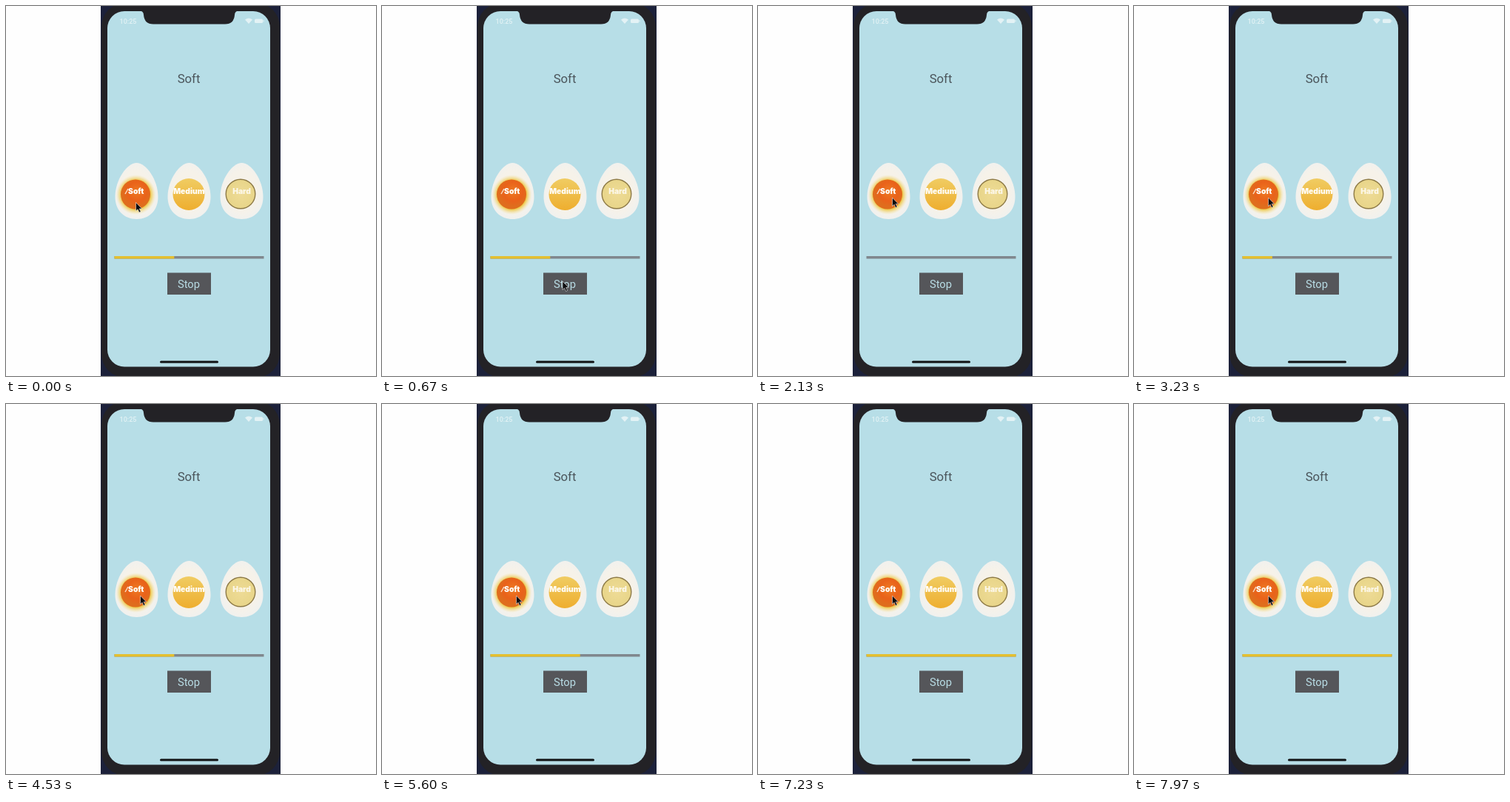
An HTML page that plays this animation: 500x500 px, repeating every 8000 ms.

```html
<!DOCTYPE html>
<html lang="en">
<head>
<meta charset="utf-8">
<title>Egg timer</title>
<style>
  html, body { margin: 0; width: 100%; height: 100%; overflow: hidden; background: #fefefe; }
  svg { display: block; width: 100%; height: 100%; }
  text { text-anchor: middle; font-family: Roboto, sans-serif; }
  .label { font: 900 10.3px Inter, sans-serif; fill: #fffdf8; }
</style>
</head>
<body>
<svg viewBox="0 0 500 500">
  <defs>
    <radialGradient id="white">
      <stop offset=".7" stop-color="#f6f2e9"/>
      <stop offset="1" stop-color="#f1f1ee"/>
    </radialGradient>
    <radialGradient id="halo">
      <stop offset=".72" stop-color="#ecc43f"/>
      <stop offset="1" stop-color="#f3e2a0" stop-opacity="0"/>
    </radialGradient>
    <radialGradient id="soft" cx=".55" cy=".4">
      <stop offset="0" stop-color="#ee7a22"/>
      <stop offset=".65" stop-color="#e9621a"/>
      <stop offset="1" stop-color="#df6d1d"/>
    </radialGradient>
    <linearGradient id="medium" x2="0" y2="1">
      <stop offset="0" stop-color="#f0cc62"/>
      <stop offset="1" stop-color="#eeae2f"/>
    </linearGradient>
    <radialGradient id="hard">
      <stop offset="0" stop-color="#eedb96"/>
      <stop offset="1" stop-color="#e8d589"/>
    </radialGradient>
    <path id="egg" d="M0 -38 C13 -38 29 -15 29 8 C29 26 17 38 0 38 C-17 38 -29 26 -29 8 C-29 -15 -13 -38 0 -38Z" fill="url(#white)"/>
  </defs>

  <!-- Phone -->
  <rect x="128" width="243" height="500" fill="#1c213a"/>
  <rect x="129" y="-4" width="241" height="506" rx="32" fill="#232226"/>
  <rect x="137" y="7" width="220" height="480.5" rx="23" fill="#b7dee7"/>
  <path d="M180 6 Q186 7 186 12 Q187 24.500 199 24.500 H296 Q308 24.500 309 12 Q309 7 315 6Z" fill="#232226"/>
  <rect x="208" y="479.500" width="79" height="3" rx="1.500" fill="#101214"/>

  <!-- Status bar -->
  <g fill="#e3f2f5">
    <text x="165" y="24" font-size="9" font-weight="500">10:25</text>
    <path d="M323 18.500 Q328 14.500 333 18.500 L328 24Z"/>
    <rect x="336" y="17.500" width="11" height="5.500" rx="1.500"/>
    <rect x="347.500" y="19" width="1" height="2.500"/>
  </g>

  <text id="title" x="247" y="104.300" font-size="16.700" fill="#4b555b"></text>

  <!-- Eggs -->
  <use href="#egg" x="176.500" y="250"/>
  <circle cx="175.500" cy="255" r="27" fill="url(#halo)"/>
  <circle cx="175" cy="254.500" r="20" fill="url(#soft)"/>
  <path d="M161 254 L165 247" stroke="#f9dcc0" stroke-width="1.500"/>
  <use href="#egg" x="247.500" y="250"/>
  <circle cx="247" cy="254.500" r="21.500" fill="url(#medium)"/>
  <use href="#egg" x="318.500" y="250"/>
  <circle cx="317" cy="254" r="19.800" fill="url(#hard)" stroke="#8d7a47" stroke-width="1.400"/>
  <text class="label" x="175.700" y="254">Soft</text>
  <text class="label" x="247.300" y="254">Medium</text>
  <text class="label" x="318.500" y="254" opacity=".85">Hard</text>

  <!-- Progress and button -->
  <rect x="146.500" y="338" width="202" height="3.500" fill="#80878d"/>
  <rect id="bar" x="146.500" y="338" height="3.500" fill="#e4bf2f"/>
  <rect x="218" y="360.500" width="59" height="29.500" fill="#55565a"/>
  <text x="247" y="381" font-size="14.700" fill="#b9dde6">Stop</text>

  <path id="cursor" d="M0 0 V11.500 L2.600 9.200 L4.500 13.500 L6.600 12.600 L4.700 8.400 H8.200Z" fill="#0c0c0e" stroke="#fff" stroke-opacity=".75" stroke-width=".7"/>
</svg>
<script>
  const LOOP = 8000, STOP_AT = 750, START_AT = 1850, TICK = 1000;
  const title = document.getElementById("title");
  const bar = document.getElementById("bar");
  const cursor = document.getElementById("cursor");

  // Pointer stops: time, x, y
  const path = [
    [0, 175.5, 265.5], [120, 175.5, 265.5], [620, 244, 372],
    [950, 244, 372], [1330, 197.5, 293], [1600, 181.5, 259], [LOOP, 181.5, 259]
  ];

  function pointerAt(t) {
    const i = path.findIndex(p => p[0] > t);
    const [t0, x0, y0] = path[i - 1], [t1, x1, y1] = path[i];
    const k = (t - t0) / (t1 - t0), e = k * k * (3 - 2 * k);
    return [x0 + (x1 - x0) * e, y0 + (y1 - y0) * e];
  }

  function progressAt(t) {
    if (t < STOP_AT) return 0.4;
    return Math.min(1, Math.max(0, Math.floor((t - START_AT) / TICK)) / 5);
  }

  function draw(now) {
    const t = now % LOOP;
    const waiting = t >= STOP_AT && t < START_AT;
    title.textContent = waiting ? "How do you like your eggs?" : "Soft";
    bar.setAttribute("width", 202 * progressAt(t));
    cursor.setAttribute("transform", `translate(${pointerAt(t)})`);
  }

  const start = performance.now();
  function frame() {
    draw(performance.now() - start);
    requestAnimationFrame(frame);
  }
  frame();
</script>
</body>
</html>
```
